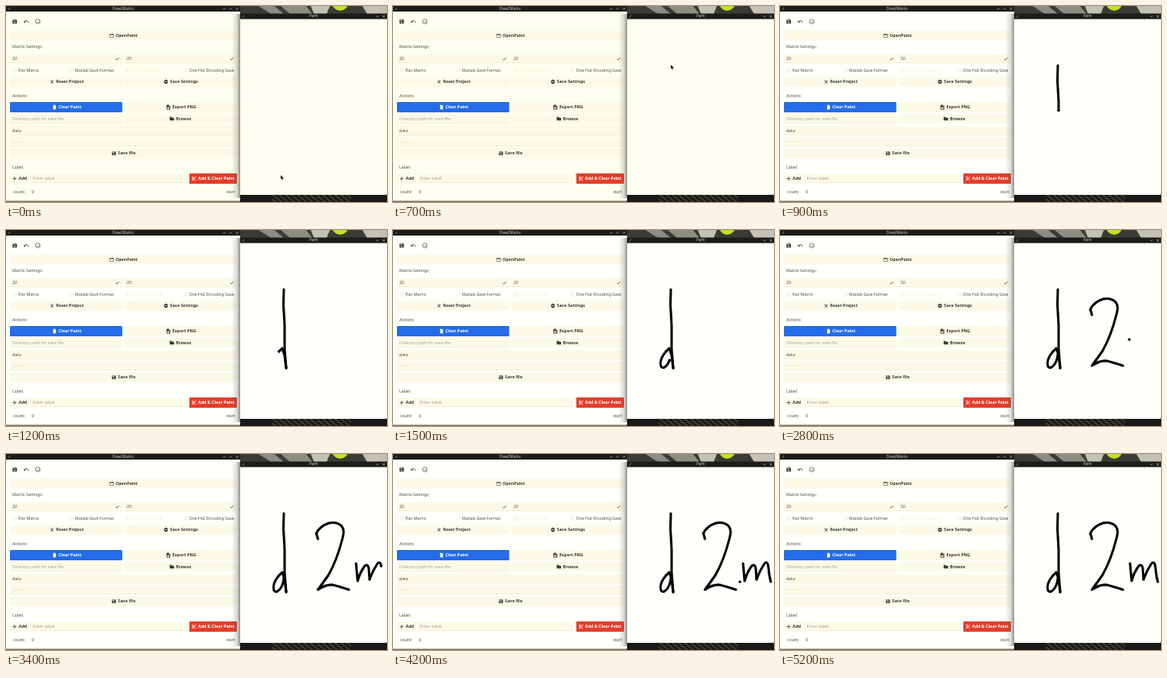
These frames come from a looping animation (480x247 px, 5.3 s). An HTML page:

```html
<!DOCTYPE html>
<html lang="en">
<head>
<meta charset="utf-8">
<title>Draw2Matrix</title>
<style>
html, body { margin: 0; width: 100%; height: 100%; overflow: hidden; background: #fff; }
svg { display: block; width: 480px; height: 247px; }
text { font: 5.2px "Noto Sans", sans-serif; fill: #4a4a45; }
.bold { font-weight: 700; font-size: 5.3px; fill: #3a3a38; }
.hint { fill: #a3a294; }
.faint { fill: #f2f0c8; }
.title { font-size: 4.4px; fill: #d4d4ce; text-anchor: middle; }
.light { fill: #fff; }
.ink { fill: none; stroke: #000; stroke-width: 3; stroke-linecap: round; stroke-linejoin: round; }
</style>
</head>
<body>
<svg id="stage" viewBox="0 0 480 247">
  <defs>
    <linearGradient id="shade">
      <stop offset="0" stop-color="#55554c" stop-opacity="0"/>
      <stop offset=".6" stop-color="#55554c" stop-opacity=".2"/>
      <stop offset="1" stop-color="#45453e" stop-opacity=".6"/>
    </linearGradient>
    <pattern id="lines" width="5" height="5" patternUnits="userSpaceOnUse" patternTransform="rotate(40)">
      <path d="M0 1H5" stroke="#77765c" stroke-width=".8"/>
    </pattern>
  </defs>
</svg>
<script>
const NS = "http://www.w3.org/2000/svg", stage = document.getElementById("stage");

function add(tag, attrs, content) {
  const node = document.createElementNS(NS, tag);
  for (const key in attrs) node.setAttribute(key, attrs[key]);
  if (content) node.textContent = content;
  return stage.appendChild(node);
}
const rect = (x, y, width, height, fill, rx = 0) => add("rect", { x, y, width, height, fill, rx });
const label = (x, y, content, kind = "") => add("text", { x, y: y + 1.9, class: kind }, content);

const shapes = {
  save: "M17 3H5a2 2 0 0 0-2 2v14a2 2 0 0 0 2 2h14a2 2 0 0 0 2-2V7zM12 19a3 3 0 1 1 0-6 3 3 0 0 1 0 6zM15 9H5V5h10z",
  undo: "M12 8c-3 0-5 1-7 3L2 7v9h9l-4-4c5-4 11-1 13 5l2-1C21 11 17 8 12 8z",
  info: "M12 2a10 10 0 1 0 0 20 10 10 0 0 0 0-20zM12 4a8 8 0 1 1 0 16 8 8 0 0 1 0-16zM11 7h2v2h-2zM11 11h2v6h-2z",
  open: "M3 4h18v16H3zM5 8v10h14V8z",
  check: "M9 16L5 12l-2 2 6 6L21 7l-2-2z",
  cross: "M19 6l-2-2-5 6-5-6-2 2 5 6-5 6 2 2 5-6 5 6 2-2-5-6z",
  page: "M6 2h9l4 4v16H6z",
  file: "M4 1h11l6 6v16H4zM14 3v5h5zM7 13v6h11v-6z",
  folder: "M2 4h8l2 3h10v13H2z",
  plus: "M10 4h3v7h7v3h-7v7h-3v-7H3v-3h7z",
  cut: "M10 8a4 4 0 1 0-2 2l2 2-2 2a4 4 0 1 0 2 2l2-2 7 7h3zM6 4a2 2 0 1 1 0 4 2 2 0 0 1 0-4zM6 16a2 2 0 1 1 0 4 2 2 0 0 1 0-4zM19 3l-6 6 2 2 7-8z",
  gear: "M10 2h4l1 3 3-1 3 4-2 3v2l2 3-3 4-3-1-1 3h-4l-1-3-3 1-3-4 2-3v-2L3 8l3-4 3 1zM12 9a3 3 0 1 0 0 6 3 3 0 0 0 0-6z"
};
function icon(name, x, y, fill = "#3a3a38", size = 6.6) {
  add("path", { d: shapes[name], fill, "fill-rule": "evenodd",
    transform: `translate(${x - size / 2} ${y - size / 2}) scale(${size / 24})` });
}

const soft = "#fafae6", dark = "#1c1c1a";
function button(x, y, width, height, name, textX, content, fill = soft, light = false) {
  rect(x, y - height / 2, width, height, fill, 1);
  icon(name, textX - 5, y, light ? "#fff" : undefined);
  label(textX, y, content, light ? "bold light" : "bold");
}
function field(x, y, width, content, kind) {
  rect(x, y - 5.5, width, 11, soft, 1);
  rect(x, y + 5, width, .5, "#e4e3cc");
  label(x + 3, y, content, kind);
}
function titleBar(x, y, width, height, content, glyphs) {
  rect(x, y, width, height, dark);
  const mid = y + height / 2, right = x + width;
  add("text", { x: x + width / 2, y: mid + 1.4, class: "title" }, content);
  add("path", { fill: "none", stroke: "#c8c8c0", "stroke-width": .6,
    d: `M${x + 3} ${mid + 1.5}l2-3` });
  glyphs.forEach((d, i) => add("path", { d, fill: "none", stroke: "#c8c8c0", "stroke-width": .6,
    transform: `translate(${right - 4 - 8 * (glyphs.length - 1 - i)} ${mid})` }));
}
const down = "M-1.7-.8L0 .9 1.7-.8", up = "M-1.7.8L0-.9 1.7.8", close = "M-1.5-1.5l3 3m0-3l-3 3";

// Desktop behind both windows
rect(294, 0, 186, 10, "#3b3b34");
add("path", { fill: "#8d8d84", d: "M318 0h20l12 10h-16zM346 0h32l8 10h-28z" });
add("path", { fill: "#c2c1b4", d: "M384 0h24l-4 10h-16zM449 0h31v10h-25z" });
add("circle", { cx: 421, cy: -4, r: 10, fill: "#bfe31f" });
rect(294, 237, 186, 10, "#191917");
rect(335, 237, 100, 10, "url(#lines)");

// Settings window
const panel = rect(0, 0, 295, 245.5, "#fffff0");
rect(0, 245.5, 295, 1.5, "#77755a");
titleBar(0, 0, 295, 7, "Draw2Matrix", [down, up, close]);
["save", "undo", "info"].forEach((name, i) => icon(name, 11 + i * 14.6, 19.5, "#333", 7.2));

button(5, 37.5, 286, 12, "open", 138, "OpenPaint");
label(8, 51.5, "Matrix Settings:");
for (const x of [5, 149]) {
  field(x, 66.5, 142, "20");
  icon("check", x + 135.5, 66.5, "#55554d", 6);
}
[[11, "Flat Matrix"], [82.5, "Matlab Save Format"], [154, "List of Dict Save", "faint"], [226, "One Hot Encoding Save"]]
  .forEach(([x, content, kind]) => {
    add("rect", { x: x - 2, y: 79, width: 4, height: 4, rx: .5, fill: "none", stroke: "#e6e4bd", "stroke-width": .6 });
    label(x + 4.5, 81, content, kind);
  });
button(5, 95.5, 142, 12, "cross", 63, "Reset Project");
button(149, 95.5, 142, 12, "gear", 206.5, "Save Settings");

label(8, 113, "Actions:");
button(5, 127.5, 141.5, 13, "page", 66, "Clear Paint", "#246cea", true);
button(149, 127.5, 142, 12, "file", 209.5, "Export PNG");
field(5, 142, 142, "Directory path for save file", "hint");
button(149, 142, 142, 11, "folder", 214, "Browse");
field(5, 157, 286, "data");
field(5, 171, 286, "name", "faint");
button(5, 185.5, 286, 12, "save", 141, "Save file");

label(8, 203, "Label:");
button(5, 217.5, 24, 12, "plus", 16, "Add");
field(31, 217.5, 197, "Enter Label", "hint");
button(231, 217.5, 60, 13, "cut", 242, "Add & Clear Paint", "#e43d2a", true);
label(9, 234, "count:");
label(32.5, 234, "0");
label(277.5, 234, "start");

// Paint window, casting its shadow to the left
rect(284, 10, 11, 232, "url(#shade)");
const paper = rect(295, 16, 184.5, 222, "#fffff0");
titleBar(295, 9.5, 185, 7, "Paint", [down, close]);

// Pen strokes: start and end time, then the path
const strokes = [
  [700, 1050, "M350 75L349.5 94 351 120 351 150 353 174"],
  [1050, 1200, "M353 174L351 158 348 149 344 153"],
  [1200, 1600, "M344 153Q337 161 337 168Q337 175 342 173Q347 170 349 162L351 152"],
  [1800, 1900, "M393 107L391 100"],
  [1900, 2450, "M391 100Q395 91 407 87Q417 85 423 91Q427 96 424 106Q417 134 406 153L393 171Q403 164 412 165Q420 167 432 171"],
  [2800, 3100, "M441 138L442 149 443 160Q446 149 452 141Q456 138 457 144L458 158"],
  [3100, 3600, "M458 158Q462 147 468 138Q472 134 473 143Q474 154 476 161"]
].map(([start, end, d]) => {
  const path = add("path", { d, class: "ink" });
  return { start, end, path, length: path.getTotalLength() };
});

// Pointer moves between strokes: start, end, from, to
const moves = [
  [0, 650, 346, 213, 350, 74],
  [1600, 1800, 351, 152, 393, 107],
  [2450, 2750, 432, 171, 440, 138],
  [3600, 4150, 476, 161, 437, 161],
  [4200, 4600, 437, 161, 262, 213]
];
const arrow = add("path", { d: "M0 0v5.6l1.4-1.2 1 2 1-.5-1-1.9h1.8z", fill: "#000", stroke: "#fff", "stroke-width": .3 });
const pen = add("circle", { r: 1.7, fill: "#000" });

const clamp = v => Math.max(0, Math.min(1, v));
const ease = v => v * v * (3 - 2 * v);
const show = (node, on) => node.setAttribute("visibility", on ? "visible" : "hidden");

function draw(t) {
  for (const node of [paper, panel]) node.setAttribute("fill", t < 800 ? "#fffff0" : "#fffffc");

  let tip = null;
  for (const { start, end, path, length } of strokes) {
    const done = length * clamp((t - start) / (end - start));
    show(path, t > start);
    path.setAttribute("stroke-dasharray", `${done} ${length + 9}`);
    if (t > start && t <= end) tip = path.getPointAtLength(done);
  }

  let point = null;
  for (const [start, end, x0, y0, x1, y1] of moves) {
    if (t < start) break;
    const k = ease(clamp((t - start) / (end - start)));
    point = { x: x0 + (x1 - x0) * k, y: y0 + (y1 - y0) * k };
  }
  const place = tip || point;
  const dotted = tip || (t >= 1600 && t <= 4200);
  show(pen, dotted);
  show(arrow, !dotted && t <= 4700);
  for (const node of [pen, arrow]) node.setAttribute("transform", `translate(${place.x} ${place.y})`);
}

const origin = performance.now();
function tick() {
  const t = (performance.now() - origin) % 5300;
  draw(Math.floor(t / 100) * 100);
  requestAnimationFrame(tick);
}
tick();
</script>
</body>
</html>
```
